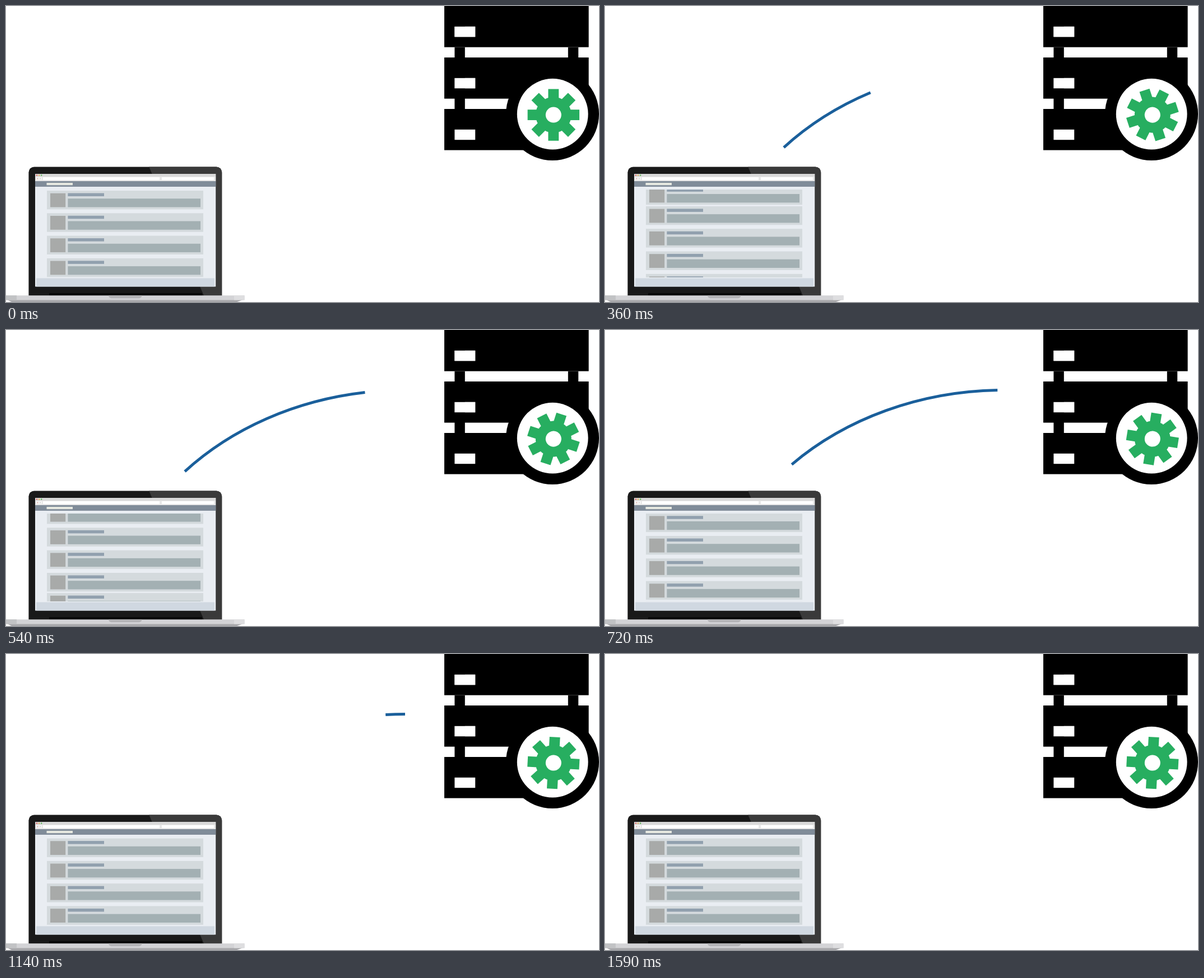
Animation, 1058 px wide and 529 px high, one loop 1620 ms. Source, as an HTML page with a canvas:

```html
<!DOCTYPE html>
<html lang="en">
<head>
<meta charset="utf-8">
<title>Laptop and server</title>
<style>
  html, body { margin: 0; width: 100%; height: 100%; overflow: hidden; background: #fff; }
  canvas { display: block; }
</style>
</head>
<body>
<canvas id="stage" width="1058" height="529"></canvas>
<script>
const ctx = document.getElementById('stage').getContext('2d');
const LOOP = 1620, TICK = 30;

function rect(color, left, top, right, bottom) {
  ctx.fillStyle = color;
  ctx.fillRect(left, top, right - left, bottom - top);
}

function disc(color, x, y, radius) {
  ctx.fillStyle = color;
  ctx.beginPath();
  ctx.arc(x, y, radius, 0, Math.PI * 2);
  ctx.fill();
}

function polygon(color, ...points) {
  ctx.fillStyle = color;
  ctx.beginPath();
  points.forEach(([x, y]) => ctx.lineTo(x, y));
  ctx.fill();
}

function clipped(addShape, draw) {
  ctx.save();
  ctx.beginPath();
  addShape();
  ctx.clip();
  draw();
  ctx.restore();
}

// cubic-bezier(.9, 0, .1, 1), solved by bisection
function steepEase(x) {
  if (x >= 1) return 1;
  let low = 0, high = 1;
  for (let i = 0; i < 24; i++) {
    const s = (low + high) / 2;
    const at = 2.7 * (1 - s) ** 2 * s + 0.3 * (1 - s) * s * s + s ** 3;
    if (at < x) low = s; else high = s;
  }
  return low * low * (3 - 2 * low);
}

// Constant speed, then an exponential slow-down towards 1
function glide(time) {
  const speed = 0.00232, decay = 109;
  const slowFrom = 1 / speed - decay;
  if (time < slowFrom) return Math.max(0, speed * time);
  return 1 - speed * decay * Math.exp((slowFrom - time) / decay);
}

function drawLine(time) {
  const length = 431, start = 176, tailDelay = 525;
  const head = glide(time - start), tail = glide(time - start - tailDelay);
  if (head - tail < 0.007) return;
  ctx.save();
  ctx.strokeStyle = '#1a5f9b';
  ctx.lineWidth = 5;
  ctx.setLineDash([length * (head - tail), 2 * length]);
  ctx.lineDashOffset = -length * tail;
  ctx.beginPath();
  ctx.ellipse(712, 557.5, 534, 450, 0, Math.PI + Math.acos(393 / 534), Math.PI * 1.5);
  ctx.stroke();
  ctx.restore();
}

function drawGear(angle) {
  const green = '#27ae60';
  ctx.save();
  ctx.translate(976.8, 194.6);
  ctx.rotate(angle);
  for (let i = 0; i < 4; i++) {
    rect(green, -46.2, -9.4, 46.2, 9.4);
    ctx.rotate(Math.PI / 4);
  }
  disc(green, 0, 0, 32);
  disc('#fff', 0, 0, 14);
  ctx.restore();
}

function drawServer(time) {
  const left = 782, unit = 18.4, pitch = 5 * unit;
  for (let i = 0; i < 3; i++) {
    const top = i * pitch;
    rect('#000', left, top, i < 2 ? left + 14 * unit : 975, top + 4 * unit);
    rect('#fff', left + unit, top + 2 * unit, left + 3 * unit, top + 3 * unit);
  }
  for (const post of [1, 12]) {
    rect('#000', left + post * unit, unit, left + (post + 1) * unit, 2 * unit);
    rect('#000', left + post * unit, 4 * unit, left + (post + 1) * unit, 2 * pitch);
  }
  for (let i = 0; i < 2; i++) {
    rect('#fff', left + unit, i * pitch + 2 * unit, left + 3 * unit, i * pitch + 3 * unit);
  }
  disc('#000', 975, 193, 83);
  disc('#fff', 975.2, 193.2, 63.4);
  drawGear(time * 0.2 * Math.PI / 180);
}

function drawCard(y) {
  rect('#d4dadd', 73, y, 352, y + 33.4);
  rect('#a8aaa9', 79, y + 4.7, 106.2, y + 29.5);
  rect('#91a0ae', 110.4, y + 4.5, 175, y + 10);
  rect('#a3b0b3', 110.4, y + 14.2, 347, y + 29.5);
}

function drawCards(time) {
  const group = 157, pitch = 40.3;
  const top = 330 + (group - 0.4) * steepEase(time / 850);
  for (let i = 0; i < 4; i++) {
    drawCard(top - group + i * pitch);
    drawCard(top + i * pitch);
  }
}

function drawBrowser() {
  rect('#d9d9d9', 52, 300, 374.2, 305);
  rect('#e8e8e8', 52, 305, 374.2, 313);
  ['#e0605a', '#e0b04c', '#5cba58'].forEach((color, i) => disc(color, 55 + i * 4.1, 302.5, 1.2));
  rect('#f6f6f5', 54, 306, 64, 311);
  rect('#fff', 66, 306, 274, 311);
  rect('#fff', 278, 306, 371, 311);
  disc('#d59a96', 56.5, 308.5, 0.9);
  disc('#bbb', 61, 308.5, 0.8);
  rect('#808c99', 52, 313, 374.2, 323);
  rect('#e6e8e0', 72.5, 316, 119, 320.2);
}

function drawLaptop(time) {
  clipped(() => ctx.roundRect(40.4, 287.4, 344.8, 232, [10, 10, 2, 2]), () => {
    rect('#191919', 40, 287, 386, 520);
    polygon('#3a3a3a', [255, 287], [386, 287], [386, 520], [354, 520]);
  });
  rect('#080808', 77, 513, 350, 518);

  rect('#e9edf2', 52, 300, 374.2, 501.5);
  clipped(() => ctx.rect(52, 328, 322, 157), () => drawCards(time));
  rect('#d0d8e1', 54, 486.5, 372, 501.5);
  drawBrowser();

  polygon('#a9a9ac', [0, 524], [425.5, 524], [412, 529], [10, 529]);
  rect('#d3d3d6', 0, 517.3, 425.5, 525.5);
  rect('#c1c2c4', 0, 517.3, 19, 525.5);
  rect('#dedee0', 407, 517.3, 425.5, 525.5);
  ctx.fillStyle = '#b3b3b6';
  ctx.beginPath();
  ctx.roundRect(183, 517.3, 59.5, 5, [0, 0, 5, 5]);
  ctx.fill();
}

const begin = performance.now();

function frame() {
  const elapsed = (performance.now() - begin) % LOOP;
  const time = Math.floor(elapsed / TICK + 0.02) * TICK % LOOP;
  rect('#fff', 0, 0, 1058, 529);
  drawServer(time);
  drawLaptop(time);
  drawLine(time);
  requestAnimationFrame(frame);
}
frame();
</script>
</body>
</html>
```
